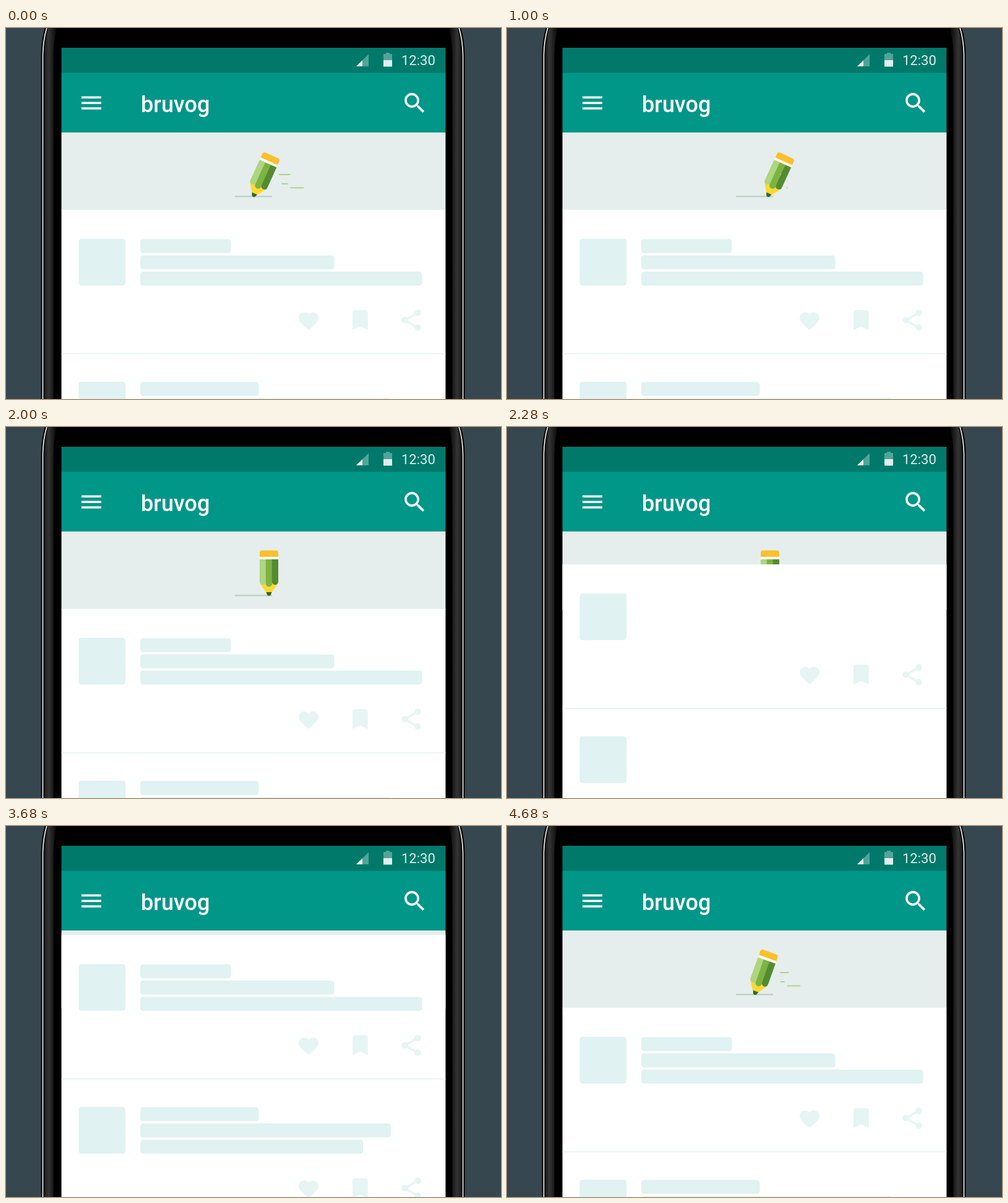
An HTML page for the animation above (4.72 s loop, 800 px wide and 600 px high).

```html
<!DOCTYPE html>
<html lang="en">
<head>
<meta charset="utf-8">
<title>Pull to refresh</title>
<style>
  html, body { margin: 0; width: 100%; height: 100%; overflow: hidden; background: #37474f; }
  svg { display: block; width: 800px; height: 600px; }
  text { font-family: Roboto, sans-serif; fill: #fff; }
  .round { fill: none; stroke-linecap: round; }
</style>
</head>
<body>
<svg viewBox="0 0 800 600">
  <defs>
    <linearGradient id="edge">
      <stop offset="0" stop-color="#1c1c1c"/>
      <stop offset=".3" stop-color="#343434"/>
      <stop offset="1" stop-color="#000"/>
    </linearGradient>
    <clipPath id="screen"><rect x="89.600" y="169" width="620.800" height="431"/></clipPath>
    <g id="icons" fill="#e5f5f4">
      <path transform="translate(469.8 455.3) scale(1.6 1.54)" d="M12 21.35l-1.45-1.32C5.4 15.36 2 12.28 2 8.5 2 5.42 4.42 3 7.5 3c1.74 0 3.41.81 4.5 2.09C13.09 3.81 14.76 3 16.5 3 19.58 3 22 5.42 22 8.5c0 3.78-3.4 6.86-8.55 11.54z"/>
      <path transform="translate(551 450.8) scale(1.78)" d="M17 3H7c-1.1 0-2 .9-2 2v16l7-3 7 3V5c0-1.1-.9-2-2-2z"/>
      <path class="round" d="M665.5 460.5L644.5 472.5L665.5 484.5" stroke="#e5f5f4" stroke-width="3.5"/>
      <circle cx="665.5" cy="460.5" r="5.3"/><circle cx="644.5" cy="472.3" r="5.3"/><circle cx="665.5" cy="484.3" r="5.2"/>
    </g>
    <g id="half">
      <path d="M56.500 600V44Q57 14 65.500 -8H400V600Z" fill="#000"/>
      <path d="M62 600V44Q62.500 16 70.500 -8H84Q77 16 76.500 44V600Z" fill="url(#edge)"/>
      <path d="M59.500 601V44Q60 15 68.500 -8" fill="none" stroke="#e8e8e8" stroke-width="1.800"/>
    </g>
  </defs>

  <rect width="800" height="600" fill="#37474f"/>
  <use href="#half"/>
  <use href="#half" transform="translate(798 0) scale(-1 1)"/>
  <rect x="89.600" y="32" width="620.800" height="41" fill="#00796b"/>
  <rect x="89.600" y="72.500" width="620.800" height="96.500" fill="#009688"/>

  <g fill="#fff">
    <path d="M586 42.500V62H566Z" opacity=".32"/>
    <path d="M576 52.300V62H566Z" opacity=".88"/>
    <path d="M614 40h6v2h4v10h-14v-10h4z" opacity=".32"/>
    <path d="M610 52h14v10.500h-14z" opacity=".88"/>
    <path d="M122 110.500h32v3.500h-32zM122 119.500h32v3.500h-32zM122 128.300h32v3.500h-32z"/>
    <path transform="translate(638.600 99.600) scale(1.83)" d="M15.5 14h-.79l-.28-.27C15.41 12.590 16 11.110 16 9.500 16 5.910 13.090 3 9.500 3S3 5.910 3 9.500 5.910 16 9.500 16c1.610 0 3.090-.59 4.230-1.570l.27.28v.79l5 4.990L20.490 19l-4.990-5zm-6 0C7.010 14 5 11.990 5 9.500S7.010 5 9.500 5 14 7.010 14 9.500 11.990 14 9.500 14z"/>
  </g>
  <text x="639" y="60" font-size="22" opacity=".88">12:30</text>
  <text x="218" y="136" font-size="36" font-weight="500">bruvog</text>

  <g clip-path="url(#screen)">
    <rect x="89" y="169" width="622" height="126" fill="#e5eeed"/>
    <path id="ground" stroke="#c1d2c6" stroke-width="2.500"/>
    <g id="pencil">
      <path id="tip" d="M-14.500 -23H14.500V-20L4.200 -5H-4.200L-14.500 -20Z" fill="#fdd835"/>
      <path id="lead" d="M-4.500 -6H4.500L2.800 -1.500Q1.700 0 0 0T-2.800 -1.500Z" fill="#33691e"/>
      <g id="stripes" class="round" stroke-width="10.300"></g>
      <g id="cap">
        <path d="M-15 -63V-69.500Q-15 -73.500 -11 -73.500H11Q15 -73.500 15 -69.500V-63Z" fill="#fbc02d"/>
        <rect x="-15" y="-63" width="30" height="4" fill="#fff"/>
      </g>
    </g>
    <g id="dashes" class="round" stroke="#aed581" stroke-width="2"></g>
    <g id="sheet"></g>
  </g>
</svg>
<script>
const LOOP = 4720;
const $ = id => document.getElementById(id);
const clamp = v => Math.min(1, Math.max(0, v));
const ramp = (t, a, b) => clamp((t - a) / (b - a));
const smooth = u => u * u * (3 - 2 * u);
const mix = (a, b, u) => a + (b - a) * u;

function bezier(x1, y1, x2, y2) {
  const at = (p, q, s) => 3 * (1 - s) * (1 - s) * s * p + 3 * (1 - s) * s * s * q + s * s * s;
  return x => {
    let lo = 0, hi = 1;
    for (let i = 0; i < 24; i++) {
      const s = (lo + hi) / 2;
      if (at(x1, x2, s) < x) lo = s; else hi = s;
    }
    return at(y1, y2, lo);
  };
}
const standard = bezier(.4, 0, .2, 1);
const decelerate = bezier(0, 0, .2, 1);

// Steps are [time, value] pairs, eased between neighbours.
function track(steps, t) {
  if (t <= steps[0][0]) return steps[0][1];
  for (let i = 1; i < steps.length; i++) {
    const [a, v] = steps[i - 1], [b, w] = steps[i];
    if (t < b) return mix(v, w, smooth(ramp(t, a, b)));
  }
  return steps[steps.length - 1][1];
}

const TIP_X = [[-40, 400], [420, 371], [1000, 421], [1580, 371], [2000, 425]];
const LEAN = [[-160, 0], [10, 24.5], [220, 24.5], [430, -24.5], [790, -24.5],
  [1000, 24.5], [1390, 24.5], [1610, -24.5], [1740, -24.5], [2000, 0]];

// Bars: width, start and end of growth.
const ROWS = [
  [[146.5, 2400, 2820], [313.5, 2340, 2720], [455.5, 2290, 2700]],
  [[191.5, 2400, 2820], [405, 2360, 2820], [360, 2310, 2720]]
];
$('sheet').innerHTML = '<rect x="89" y="294" width="622" height="440" fill="#fff"/>' +
  ROWS.map((bars, r) => `<g transform="translate(0 ${r * 231})">
    <g fill="#e0f2f1"><rect x="117.500" y="341" width="75.500" height="75.500" rx="4.500"/>
    ${bars.map((b, i) => `<rect class="bar" x="217" y="${341.5 + i * 26.3}" height="22.500" rx="4.500"/>`).join('')}
    </g><rect x="89" y="526" width="622" height="1.600" fill="#e6f3f2"/><use href="#icons"/></g>`).join('');
const barEls = [...document.querySelectorAll('.bar')];
const bars = ROWS.flat();

// Stripes: colour, final x and bottom, then x, top and bottom at the jump's peak.
const STRIPES = [
  ['#aed581', -9.9, -23, -14, -67, -42],
  ['#7cb342', 0, -20, -5, -73, -45],
  ['#558b2f', 9.9, -23, 5, -75, -46]
];
const addPath = parent => parent.appendChild(document.createElementNS('http://www.w3.org/2000/svg', 'path'));
const stripeEls = STRIPES.map(s => {
  const el = addPath($('stripes'));
  el.setAttribute('stroke', s[0]);
  return el;
});

// Speed lines: y, from, to, head start/end, tail start/end.
const DASHES = [
  [237, 442, 459.5, 0, 168, 160, 300],
  [252, 442.5, 455.5, 90, 164, 110, 270],
  [258.5, 452.5, 482, 0, 170, 100, 280]
];
const BURSTS = [[-160, 1], [440, -1], [1000, 1], [1600, -1]];
const dashEls = DASHES.map(() => addPath($('dashes')));

function drawStripes(t) {
  const build = t > 3600;
  const rise = build ? smooth(ramp(t, 3700, 3920)) : 1;
  const settle = build ? smooth(ramp(t, 3920, 4120)) : 1;
  STRIPES.forEach(([, x, bottom, px, pTop, pBottom], i) => {
    const y0 = mix(mix(20, pTop, rise), -58, settle);
    const y1 = mix(mix(45, pBottom, rise), bottom, settle);
    const x0 = mix(px, x, settle), x1 = mix(px + 3, x, settle);
    const cx = mix(px + 3.5, x, settle);
    stripeEls[i].setAttribute('d', `M${x0} ${y0}Q${cx} ${(y0 + y1) / 2} ${x1} ${y1}`);
  });
  const cap = build ? smooth(ramp(t, 4020, 4230)) : 1;
  const tip = build ? smooth(ramp(t, 4020, 4200)) : 1;
  $('cap').setAttribute('transform', `translate(0 ${-61 * (1 - cap)}) scale(${cap})`);
  for (const id of ['tip', 'lead'])
    $(id).setAttribute('transform', `translate(0 ${-20 * (1 - tip)}) scale(${tip})`);
}

function drawDashes(t) {
  const burst = BURSTS.find(([start]) => t >= start && t < start + 300);
  DASHES.forEach(([y, a, b, h0, h1, k0, k1], i) => {
    let d = '';
    if (burst) {
      const v = t - burst[0];
      const head = ramp(v, h0, h1), tail = smooth(ramp(v, k0, k1));
      const place = u => burst[1] > 0 ? mix(a, b, u) : 793 - mix(a, b, u);
      if (tail < head) d = `M${place(tail)} ${y}H${place(head)}`;
    }
    dashEls[i].setAttribute('d', d);
  });
}

function draw(t) {
  const w = t >= 4560 ? t - LOOP : t;
  const building = t > 3600 && t < 4560;
  const x = building ? 400 : track(TIP_X, w);
  const lean = building ? 0 : track(LEAN, w);
  $('pencil').setAttribute('transform', `translate(${x} 273) rotate(${lean})`);
  drawStripes(w);
  drawDashes(w);

  const half = building ? 0 : 30 * smooth(ramp(w, -160, -50));
  $('ground').setAttribute('d', half ? `M${400 - half} 272.500H${400 + half}` : '');

  const lift = t < 3600 ? decelerate(ramp(t, 2160, 2648)) : 1 - standard(ramp(t, 3600, 4168));
  $('sheet').setAttribute('transform', `translate(0 ${-125 * lift})`);
  bars.forEach(([width, a, b], i) => {
    const grown = t >= 2200 && t < 2840 ? standard(ramp(t, a, b)) : 1;
    barEls[i].setAttribute('width', width * grown);
  });
}

const began = performance.now();
function tick() {
  draw((performance.now() - began) % LOOP);
  requestAnimationFrame(tick);
}
draw(0);
requestAnimationFrame(tick);
</script>
</body>
</html>
```
